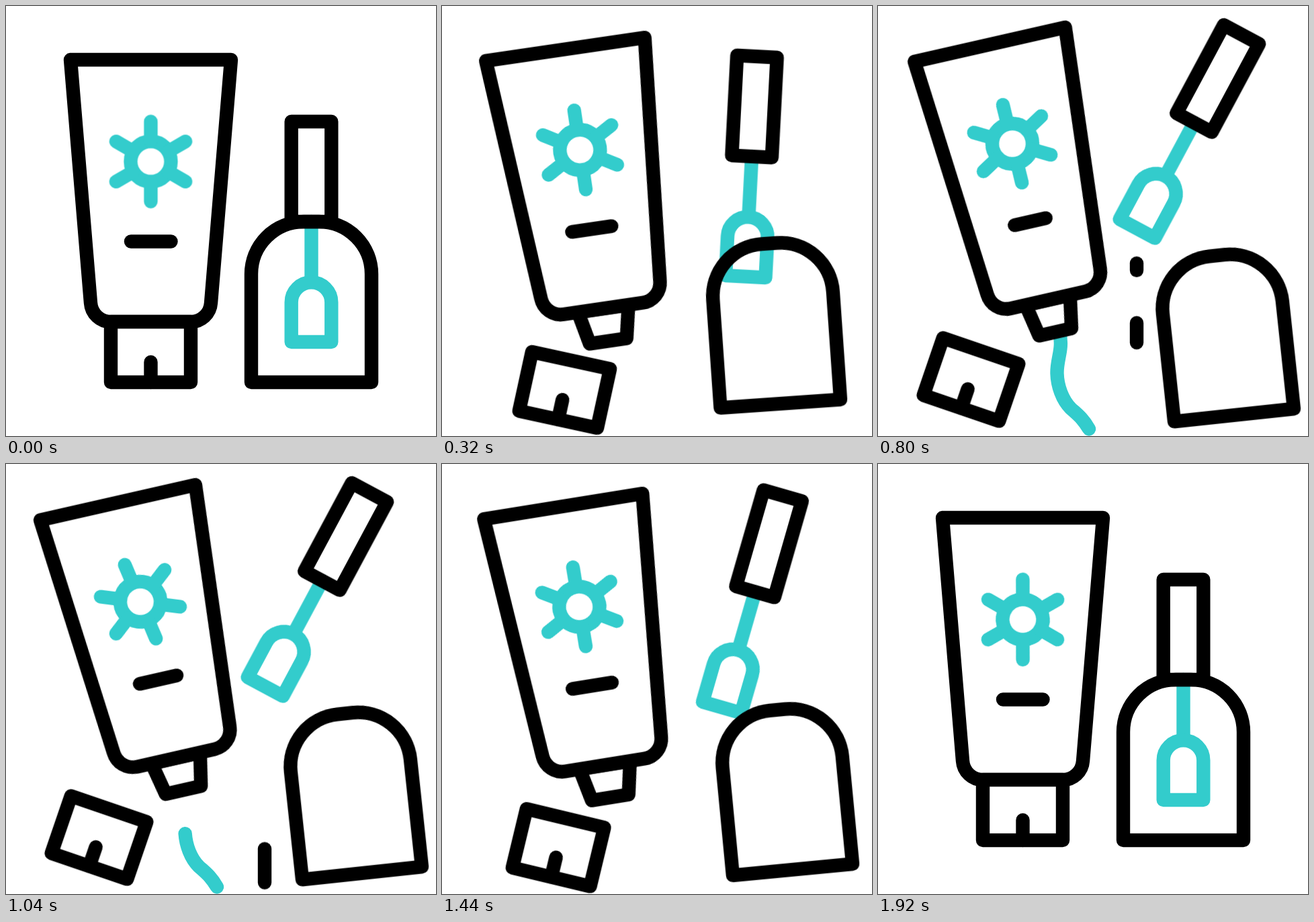
Recreate the animation shown at these times as an HTML page without scripts. Size 640 by 640 pixels, loop 2000 ms.

```html
<!DOCTYPE html>
<html lang="en">
<head>
<meta charset="utf-8">
<title>Nail care</title>
<style>
@property --p { syntax: "<number>"; inherits: true; initial-value: 0; }

html, body { margin: 0; width: 100%; height: 100%; overflow: hidden; background: #fff; }
svg { display: block; width: 100%; height: 100%; }

path, line, circle {
  fill: none;
  stroke: #000;
  stroke-width: 20.4;
  stroke-linecap: round;
  stroke-linejoin: round;
}
.teal { stroke: #3cc; }
.white { fill: #fff; }

/* --p runs from 0 (closed) to 1 (open) */
.tube, .cap { animation: open-a 2s cubic-bezier(.33, 0, .67, 1) infinite; }
.bottle, .brush { animation: open-b 2s cubic-bezier(.33, 0, .67, 1) infinite; }

.tube {
  transform-origin: 215.5px 231.5px;
  transform: translate(calc(var(--p) * -15.5px), calc(var(--p) * -26.5px))
    rotate(calc(var(--p) * -12.8deg));
}
.cap {
  transform-origin: 215.5px 515px;
  transform: translate(
      calc(var(--p) * (130 + var(--p) * (-409.5 + var(--p) * 202.5)) * 1px),
      calc(var(--p) * (172 - var(--p) * 131) * 1px))
    rotate(calc(var(--p) * 18.9deg));
}
.bottle {
  transform-origin: 365px 560px;
  transform: translate(calc(var(--p) * 76px), calc(var(--p) * 58.5px))
    rotate(calc(var(--p) * -6.1deg));
}
/* slides out first, then swings aside */
.brush {
  --q: calc(max(0, var(--p) - .63) / .37);
  --s: calc(var(--q) * var(--q));
  transform-origin: 454.5px 246.5px;
  transform: translate(
      calc((var(--p) * 16 + var(--s) * 35.2) * 1px),
      calc((var(--p) * -149 + var(--s) * 10.5) * 1px))
    rotate(calc((var(--p) * 4.5 + var(--s) * 23.7) * 1deg));
}
@keyframes open-a {
  0%, 4% { --p: 0; }
  24% { --p: 1; }
  62% { --p: 1; animation-timing-function: cubic-bezier(.33, 0, .6, 1); }
  92%, 100% { --p: 0; }
}
@keyframes open-b {
  0%, 4% { --p: 0; }
  24%, 66% { --p: 1; }
  96%, 100% { --p: 0; }
}

.sun { animation: spin 2s cubic-bezier(.33, 0, .67, 1) infinite; }
@keyframes spin {
  0%, 22% { transform: rotate(0deg); }
  58.5%, 100% { transform: rotate(120deg); }
}

.squeeze {
  vector-effect: non-scaling-stroke;
  transform-origin: 215.5px 350px;
  animation: squeeze 2s cubic-bezier(.33, 0, .67, 1) infinite;
}
.body { --w: .963; }
.nozzle { --w: .89; }
.label { --w: .8; }
@keyframes squeeze {
  0%, 22%, 58%, 100% { transform: scaleX(1); }
  40% { transform: scaleX(var(--w)); }
}

.cream { stroke-dasharray: 1 2; animation: flow 2s ease-in-out infinite; }
@keyframes flow {
  0%, 23% { stroke-dashoffset: 1.05; visibility: hidden; }
  23.1% { stroke-dashoffset: 1.05; visibility: visible; }
  40%, 44% { stroke-dashoffset: 0; visibility: visible; }
  62% { stroke-dashoffset: -1; visibility: visible; }
  62.1%, 100% { stroke-dashoffset: -1.1; visibility: hidden; }
}

/* drops speed up and stretch as they fall */
.drop {
  vector-effect: non-scaling-stroke;
  animation: fall 2s cubic-bezier(.333, 0, .667, .333) infinite;
}
.late { animation-delay: -1.866s; }
@keyframes fall {
  0%, 23% { transform: scaleY(0); visibility: hidden; }
  23.01% { transform: scaleY(.0001); visibility: visible; }
  57% { transform: scaleY(4); visibility: visible; }
  57.1%, 100% { transform: scaleY(4); visibility: hidden; }
}
</style>
</head>
<body>
<svg viewBox="0 0 640 640">
  <path class="cream teal" pathLength="1" d="M270 485C276 512 266 524 266.500 547C267 565 274 586 287 599C298 609 305 614 314 629.500"/>

  <g class="tube">
    <path class="nozzle squeeze white" d="M177.500 470L188 519H243.500L253.500 470Z"/>
    <path class="body squeeze white" d="M96 80H335L305 442A30 30 0 0 1 275 470H156A30 30 0 0 1 126 442Z"/>
    <line class="label squeeze" x1="186" y1="350.500" x2="245.500" y2="350.500"/>
    <g transform="translate(215.500 231.500)">
      <g class="sun">
        <circle class="teal" r="30"/>
        <path class="teal" d="M0-59.500V-30M0 59.500V30M51.600-29.800L26-15M51.600 29.800L26 15M-51.600-29.800L-26-15M-51.600 29.800L-26 15"/>
      </g>
    </g>
  </g>

  <g class="cap">
    <path class="white" d="M156 470H275V560H156Z"/>
    <path d="M215.500 530V560"/>
  </g>

  <g transform="translate(385 331)">
    <line class="drop" y1="140" y2="169"/>
    <line class="drop late" y1="140" y2="169"/>
  </g>

  <g class="brush">
    <path class="teal" d="M454.500 321V411"/>
    <path class="teal white" d="M424.700 500V441A29.800 29.800 0 0 1 484.300 441V500Z"/>
    <path d="M424.700 172H484.300V321H424.700Z"/>
  </g>

  <path class="bottle" d="M365 560V399A78 78 0 0 1 443 321H466A78 78 0 0 1 544 399V560Z"/>
</svg>
</body>
</html>
```
